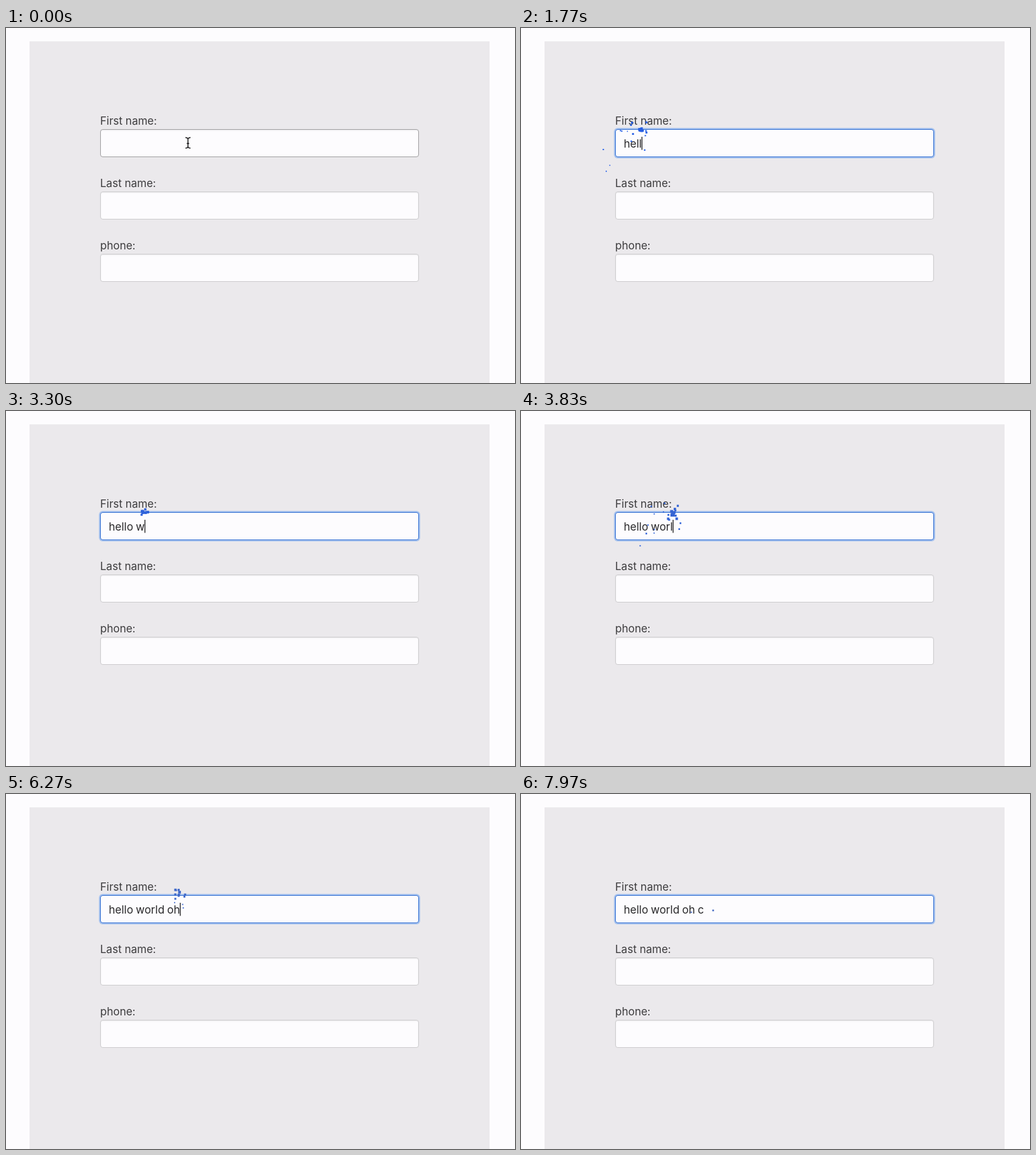
Write an HTML page with a canvas that moves like this. It is 800 px wide and 558 px high and loops after 8 s.

```html
<!DOCTYPE html>
<html lang="en">
<head>
<meta charset="utf-8">
<title>Typing sparks</title>
<style>
  html, body { margin: 0; width: 100%; height: 100%; overflow: hidden; background: #fdfcfe; }
  #stage { position: relative; width: 800px; height: 558px; overflow: hidden; font: 17px/20px Inter, "Open Sans", sans-serif; color: #3d3c3e; }
  #stage > * { position: absolute; box-sizing: border-box; }
  .panel { left: 37px; top: 21px; width: 723px; height: 537px; background: #ebe9ec; }
  .label { left: 148px; white-space: pre; }
  .field { left: 148px; width: 501px; height: 44px; border: 1px solid #cccbcd; border-radius: 4px; background: #fdfcfe; box-shadow: inset 0 1px 2px rgba(0, 0, 0, .08); }
  .field.hover { border-color: #a09fa1; }
  .field.focus { border-color: #2f6cd2; box-shadow: 0 0 0 2px #a9c4ee; }
  #typed { left: 161.5px; top: 172px; color: #29282a; white-space: pre; word-spacing: -.6px; }
  #beam { left: 281px; top: 171px; }
  #sparks { left: 0; top: 0; }
</style>
</head>
<body>
<div id="stage">
  <div class="panel"></div>
  <div class="label" style="top:136px">First name:</div>
  <div class="field hover" id="first" style="top:159px"></div>
  <div class="label" style="top:234px">Last name:</div>
  <div class="field" style="top:257px"></div>
  <div class="label" style="top:332px">phone:</div>
  <div class="field" style="top:355px"></div>
  <div id="typed"></div>
  <svg id="beam" width="10" height="19" fill="none" stroke="#1d1c1e" stroke-width="1.5">
    <path d="M1 1.2Q5 1.2 5 4V15Q5 17.8 1 17.8M9 1.2Q5 1.2 5 4M5 15Q5 17.8 9 17.8M3 10.5H7"/>
  </svg>
  <canvas id="sparks" width="800" height="558"></canvas>
</div>
<script>
const LOOP = 8000, STEP = 100 / 3, FOCUS = 230, BLINK = 500;
const TEXT_X = 161.5, SPARK_Y = 165, GRAVITY = 350, PER_KEY = 9;

const message = "hello world oh c";
const keyTimes = [1000, 1250, 1530, 1700, 2030, 2370, 3200, 3370, 3570, 3770,
                  4030, 4830, 5770, 6100, 6970, 7430];

const $ = id => document.getElementById(id);
const first = $("first"), typed = $("typed"), beam = $("beam");
const ctx = $("sparks").getContext("2d");
ctx.font = '17px Inter, "Open Sans", sans-serif';
ctx.wordSpacing = "-0.6px";

let seed = 17;
const rand = (lo, hi) => {
  seed = (seed * 16807) % 2147483647;
  return lo + (hi - lo) * seed / 2147483647;
};
// the picture advances thirty times a second
const snap = ms => Math.floor((ms + 4) / STEP) * STEP;
const caretX = text => TEXT_X + ctx.measureText(text).width;

// each key throws a burst from the caret; the blue dulls as typing goes on
const sparks = keyTimes.flatMap((time, i) => {
  const x = caretX(message.slice(0, i + 1));
  const color = `hsl(222 ${82 - 2 * i}% 52%)`;
  return Array.from({ length: PER_KEY }, () => ({
    born: snap(time), x, color,
    vx: rand(-55, 50), vy: rand(-122, -30),
    life: rand(.3, .9), size: rand(3.4, 5)
  }));
});

function drawSparks(t) {
  for (const s of sparks) {
    const age = (t - s.born) / 1000;
    if (age < 0 || age >= s.life) continue;
    const size = s.size * (1 - .6 * age / s.life);
    const x = s.x + s.vx * age;
    const y = SPARK_Y + s.vy * age + GRAVITY * age * age / 2;
    ctx.fillStyle = s.color;
    ctx.fillRect(x - size / 2, y - size / 2, size, size);
  }
}

function drawCaret(t, text, lastKey) {
  if ((t - lastKey + 1) % (2 * BLINK) >= BLINK) return;
  ctx.fillStyle = "#29282a";
  ctx.fillRect(caretX(text) - .3, 171, 1.4, 20.5);
}

function draw(ms) {
  const t = snap(ms % LOOP);
  const count = keyTimes.filter(time => snap(time) <= t).length;
  const text = message.slice(0, count);
  const focused = t >= snap(FOCUS);

  beam.style.display = t < STEP ? "block" : "none";
  first.className = "field " + (focused ? "focus" : "hover");
  if (typed.textContent !== text) typed.textContent = text;

  ctx.clearRect(0, 0, 800, 558);
  if (focused) drawCaret(t, text, snap(count ? keyTimes[count - 1] : FOCUS));
  drawSparks(t);
}

const start = performance.now();
function tick() {
  draw(performance.now() - start);
  requestAnimationFrame(tick);
}
tick();
</script>
</body>
</html>
```
